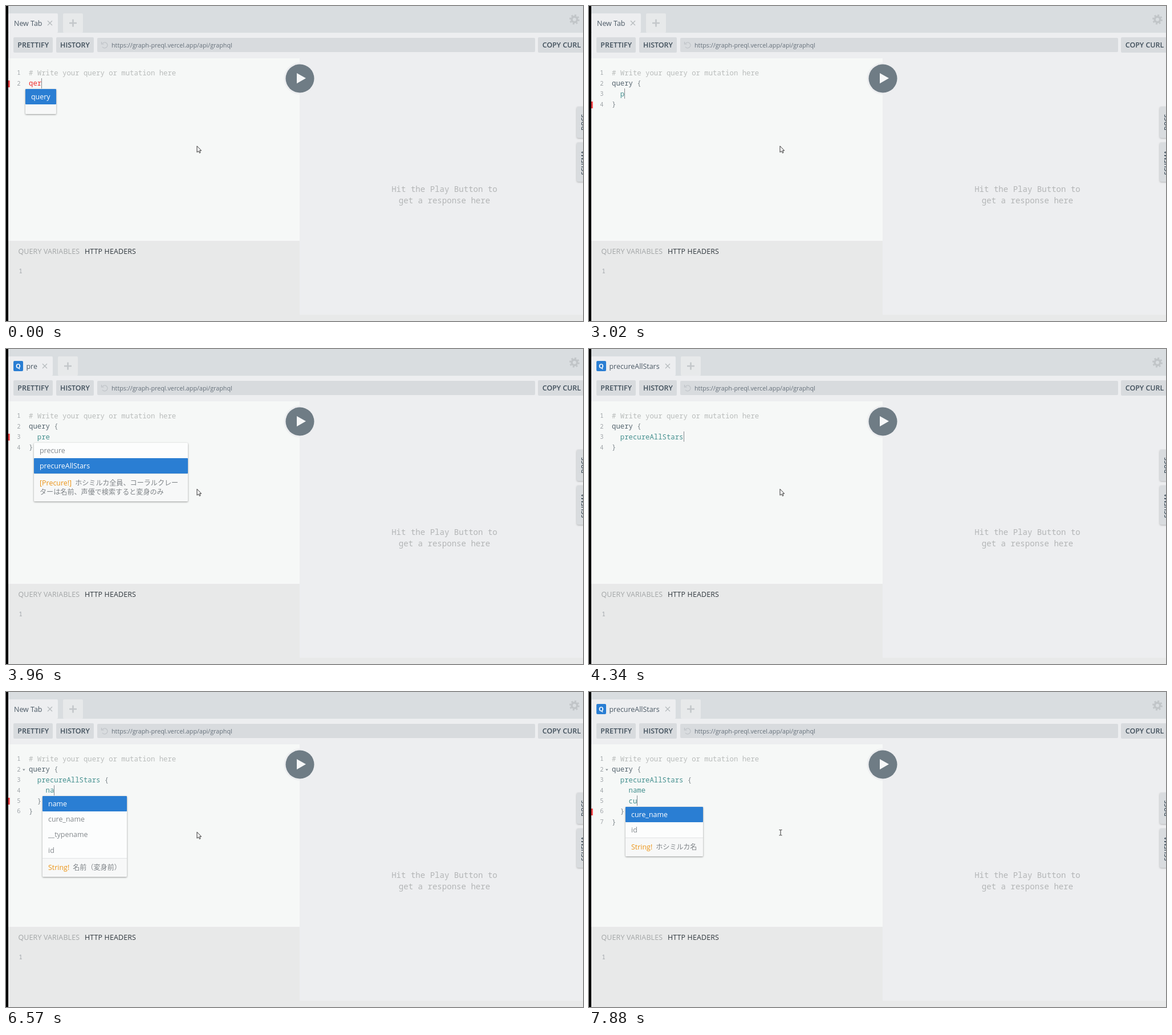
Animation of 1012 by 554 pixels, one loop 8000 ms. Source, as an HTML page:

```html
<!DOCTYPE html>
<html lang="en">
<head>
<meta charset="utf-8">
<title>Query editor</title>
<style>
html, body { margin: 0; width: 100%; height: 100%; overflow: hidden; background: #edeef0; }
svg { display: block; width: 1012px; height: 554px; }
text { font: 12.45px "Open Sans", "Noto Sans CJK JP", "Noto Sans CJK", sans-serif; white-space: pre; }
.semi text { font-weight: 600; fill: #3f4e5a; }
.semi .side { font-size: 10.5px; }
.panel text { letter-spacing: .14px; }
.code { font: 12.3px "Noto Sans Mono", "Liberation Mono", monospace; }
.num { font-size: 10.5px; fill: #a0a5a9; }
.big { font-size: 14.07px; fill: #b3b5b6; }
.url { font-size: 10.78px; fill: #66717b; }
.badge { font-size: 11px; font-weight: 700; fill: #fff; }
.comment { fill: #b9bcbb; }
.keyword { fill: #56656f; }
.field { fill: #45908f; }
.bad { fill: #f02b2b; }
.punct { fill: #7f888d; }
.note { fill: #7f8488; }
.note .ja { font-family: "Noto Sans CJK JP", "Noto Sans CJK", sans-serif; font-size: 12.1px; font-weight: 300; }
.type { fill: #ec9417; }
.popup { filter: drop-shadow(0 1px 1.5px rgba(0, 0, 0, .4)); }
.shade { filter: drop-shadow(0 1px 1.5px rgba(0, 0, 0, .25)); }
</style>
</head>
<body>
<svg viewBox="0 0 1012 554">
  <rect width="1012" height="554" fill="#edeef0"/>
  <rect width="1012" height="47" fill="#d9dde0"/>
  <g id="tab"></g>

  <g fill="none" stroke="#c1c5c8">
    <circle cx="997" cy="23.7" r="4.8" stroke-width="3.6"/>
    <circle cx="997" cy="23.7" r="7.6" stroke-width="2.6" stroke-dasharray="2.985"/>
  </g>

  <g fill="#d8dbde">
    <rect x="13" y="55" width="69" height="27" rx="2"/>
    <rect x="88" y="55" width="66" height="27" rx="2"/>
    <rect x="160" y="56" width="768" height="25" rx="2"/>
    <rect x="933" y="55" width="90" height="27" rx="2"/>
  </g>
  <path d="M169 66a5 5 0 1 1 0 6M167.5 63v4h4" fill="none" stroke="#bdc1c5" stroke-width="1.1"/>
  <text class="url" x="185" y="73">https://graph-preql.vercel.app/api/graphql</text>

  <rect x="4" y="92" width="511" height="321" fill="#f6f8f7"/>
  <rect x="4" y="413" width="511" height="141" fill="#e8e9e9"/>
  <rect x="515" y="543" width="497" height="11" fill="#e8e9e9"/>
  <g class="panel">
    <text x="21.5" y="436" fill="#a3a6a7">QUERY VARIABLES</text>
    <text x="138" y="436" fill="#2f373d">HTTP HEADERS</text>
  </g>
  <text class="code num" x="22.5" y="470">1</text>

  <g text-anchor="middle">
    <text class="code big" x="769" y="327">Hit the Play Button to</text>
    <text class="code big" x="769" y="347">get a response here</text>
  </g>
  <circle cx="515.5" cy="127.5" r="28" fill="#edeef0"/>
  <circle cx="515.5" cy="127.5" r="25" fill="#6f7c85"/>
  <path d="M510 118L526 127L510 136.3Z" fill="#f6f7f8"/>

  <g class="shade" fill="#d9dcdf">
    <rect x="1001" y="177" width="30" height="55" rx="3"/>
    <rect x="1001" y="240" width="30" height="69" rx="3"/>
  </g>
  <g class="semi" text-anchor="middle">
    <text x="47.7" y="73">PRETTIFY</text>
    <text x="121" y="73">HISTORY</text>
    <text x="974.5" y="73">COPY CURL</text>
    <text class="side" transform="translate(1016.5 204.5) rotate(-90)">DOCS</text>
    <text class="side" transform="translate(1016.5 275.5) rotate(-90)">SCHEMA</text>
  </g>

  <g id="editor"></g>
  <g id="mouse" fill="#fff" stroke="#333" stroke-linejoin="round"></g>
  <rect width="4" height="554"/>
</svg>
<script>
const LOOP = 8000, LEFT = 40, CHAR = 7.38, ROW = 18.45, ITEM = 27.2;
const $ = id => document.getElementById(id);
const baseline = row => 122 + ROW * (row - 1);
const charX = col => LEFT + CHAR * col;

// Suggestion lists: word start, width, entries, selected entry, type, description lines
const queryList = { row: 2, col: 0, width: 54, items: ['query'], pick: 0, type: '', note: [] };
const rootList = {
  row: 3, col: 2, width: 270, items: ['precure', 'precureAllStars'], pick: 0, type: 'Precure',
  note: ['ホシミルカ検索、コーラルクレータ', 'ーは名前、声優で検索すると最初の変身のみ']
};
const allList = {
  ...rootList, pick: 1, type: '[Precure!]',
  note: ['ホシミルカ全員、コーラルクレー', 'ターは名前、声優で検索すると変身のみ']
};
const nameList = {
  row: 4, col: 4, width: 148, items: ['name', 'cure_name', '__typename', 'id'], pick: 0,
  type: 'String!', note: ['名前（変身前）']
};
const cureList = {
  row: 5, col: 4, width: 136, items: ['cure_name', 'id'], pick: 0, type: 'String!', note: ['ホシミルカ名']
};

const nested = body => `query {\n  precureAllStars {\n${body}\n  }\n}`;

// Each step changes only the listed parts of the state
const steps = [
  [0, { code: 'qer', caret: [2, 3], error: 2, list: queryList, title: '', fold: false, beam: false }],
  [270, { code: 'query', caret: [2, 5], error: 0, list: null }],
  [550, { code: 'query ', caret: [2, 6] }],
  [1070, { caret: null, error: 2 }],
  [1580, { caret: [2, 6] }],
  [1740, { code: 'query {}', caret: [2, 7] }],
  [2010, { code: 'query {\n  \n}', caret: [3, 2] }],
  [2520, { caret: null, error: 4 }],
  [3020, { code: 'query {\n  p\n}', caret: [3, 3] }],
  [3170, { code: 'query {\n  pre\n}', caret: [3, 5], list: rootList }],
  [3310, { title: 'pre' }],
  [3700, { caret: null, error: 3 }],
  [3960, { list: allList }],
  [4340, { code: 'query {\n  precureAllStars\n}', caret: [3, 17], error: 0, list: null, title: 'precureAllStars' }],
  [4730, { caret: [3, 18] }],
  [5250, { caret: null, error: 3 }],
  [5510, { code: 'query {\n  precureAllStars {}\n}', caret: [3, 19] }],
  [5780, { code: nested(''), caret: [4, 4], fold: true }],
  [5900, { title: '' }],
  [6300, { caret: null, error: 5 }],
  [6430, { code: nested('    n'), caret: [4, 5] }],
  [6570, { code: nested('    na'), caret: [4, 6], list: nameList }],
  [6690, { title: 'precureAllStars' }],
  [7000, { code: nested('    name'), caret: [4, 8], error: 0, list: null }],
  [7360, { code: nested('    name\n'), caret: [5, 4] }],
  [7530, { code: nested('    name\n    c'), caret: [5, 5] }],
  [7710, { code: nested('    name\n    cu'), caret: [5, 6], list: cureList }],
  [7880, { error: 6, beam: true }]
];
const tabEnds = { '': 91, pre: 82, precureAllStars: 152 };

const rect = (x, y, w, h, fill, more = '') =>
  `<rect x="${x}" y="${y}" width="${w}" height="${h}" fill="${fill}" ${more}/>`;
const text = (x, y, body, more = '') => `<text x="${x}" y="${y}" ${more}>${body}</text>`;

function drawTab(title) {
  const end = tabEnds[title];
  const badge = title
    ? rect(13, 21, 17, 18, '#2a7ed3', 'rx="2"') + text(21.3, 34, 'Q', 'class="badge" text-anchor="middle"')
    : '';
  return rect(4, 13, end - 4, 34, '#edeef0', 'rx="2"') + rect(end + 9, 13, 35, 34, '#e7e9ea', 'rx="2"') +
    badge + text(title ? 35.5 : 14, 34.5, title || 'New Tab', 'fill="#4b5965"') +
    `<path d="M${end - 18} 26l8 8m0 -8l-8 8" stroke="#b4b9bc" stroke-width="1.2"/>` +
    `<path d="M${end + 20} 30h13m-6.5 -6.5v13" stroke="#c3c7ca" stroke-width="2.6"/>`;
}

function paint(line) {
  if (line[0] === '#') return `<tspan class="comment">${line}</tspan>`;
  return line.replace(/\w+|[{}]/g, word => {
    const kind = { query: 'keyword', qer: 'bad', '{': 'punct', '}': 'punct' }[word] || 'field';
    return `<tspan class="${kind}">${word}</tspan>`;
  });
}

function drawList({ row, col, width, items, pick, type, note }) {
  const x = Math.round(charX(col) - 5.6), y = Math.round(baseline(row) + 5.8);
  const itemTop = i => Math.round(y + ITEM * i);
  const foot = itemTop(items.length), footHeight = 17 + 16 * note.length;
  let out = rect(x, y, width, foot - y + footHeight, '#fcfdfd', 'rx="2"') +
    rect(x, foot, width, footHeight, '#f7f8f8', 'rx="2"');
  if (type) out += rect(x, foot, width, 1, '#e1e3e4');
  items.forEach((item, i) => {
    const top = itemTop(i);
    if (i === pick) out += rect(x, top, width, 27, '#2a7ed3', 'rx="1"');
    out += text(x + 10, top + 18, item, `fill="${i === pick ? '#fff' : '#83888c'}"`);
  });
  note.forEach((line, i) => {
    const label = i ? '' : `<tspan class="type">${type}</tspan>`;
    out += text(x + 10, foot + 21 + 16 * i, `${label}<tspan class="ja" dx="${i ? 0 : 6}">${line}</tspan>`, 'class="note"');
  });
  return `<g class="popup">${out}</g>`;
}

function drawEditor({ code, caret, error, list, fold }) {
  const lines = ['# Write your query or mutation here', ...code.split('\n')];
  let out = lines.map((line, i) => {
    const y = baseline(i + 1);
    return text(25.5, y - 0.8, i + 1, 'class="code num" text-anchor="end"') +
      text(LEFT, y, paint(line), 'class="code"');
  }).join('');
  if (error) out += rect(4, Math.round(baseline(error) - 9.5), 2.7, 12, '#f23b40');
  if (fold) out += '<path d="M29 135.5h4.6l-2.3 3z" fill="#8b9195"/>';
  if (caret) {
    const [row, col] = caret;
    out += rect(Math.round(charX(col) + 0.1), Math.round(baseline(row) - 13.5), 1, 18, '#858c90');
  }
  return out + (list ? drawList(list) : '');
}

const drawMouse = beam => beam
  ? '<path d="M333.5 242.5h2l.5 .5l.5 -.5h2M336 243v8.5M333.5 252h2l.5 -.5l.5 .5h2" fill="none"/>'
  : '<path d="M335 246.3v11l2.6 -2.3l1.8 3.6l1.7 -.8l-1.7 -3.5h3.2z"/>';

let shown = -1;
function frame(now) {
  const time = now % LOOP;
  const index = steps.findLastIndex(([start]) => start <= time);
  if (index !== shown) {
    shown = index;
    const state = Object.assign({}, ...steps.slice(0, index + 1).map(step => step[1]));
    $('tab').innerHTML = drawTab(state.title);
    $('editor').innerHTML = drawEditor(state);
    $('mouse').innerHTML = drawMouse(state.beam);
  }
  requestAnimationFrame(frame);
}
frame(0);
</script>
</body>
</html>
```
